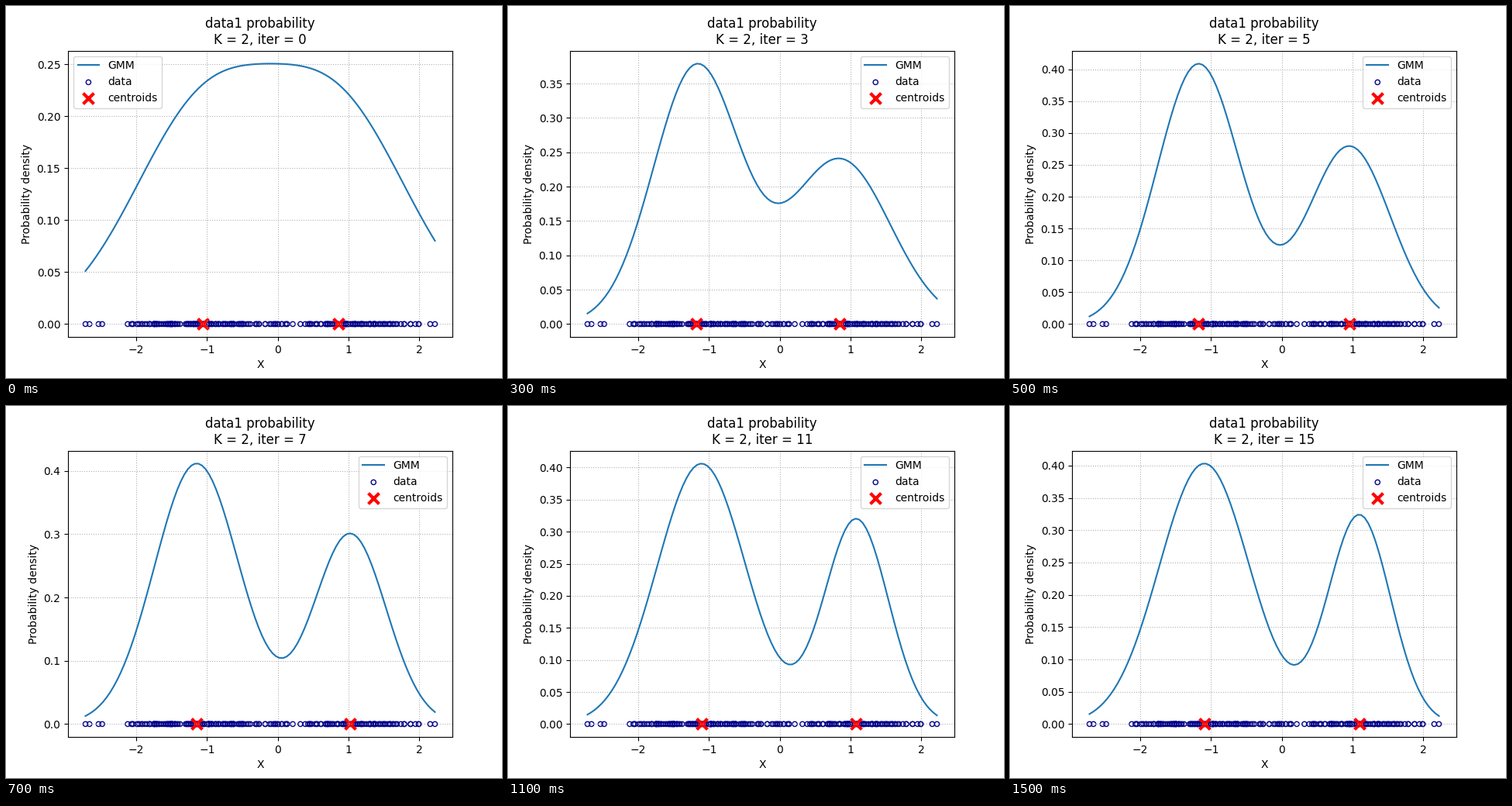
A matplotlib script for the animation above (1.6 s loop, 640 by 480 pixels).

```python
import numpy as np
import matplotlib.pyplot as plt
from matplotlib.animation import FuncAnimation

STEPS = 16
N_SAMPLES = 250
X_MIN, X_MAX = -2.717, 2.222
MARGIN = 0.05

# Each mixture is (weights, means, deviations) of its two components
POPULATION = np.array([[0.645, 0.355], [-1.089, 1.102], [0.640, 0.437]])
START = np.array([[0.5, 0.5], [-1.063, 0.864], [1.0, 1.0]])


def components(x, mixture):
    """Weighted normal densities, one column per component."""
    weights, means, devs = mixture
    z = (x[:, None] - means) / devs
    return weights * np.exp(-z ** 2 / 2) / (devs * np.sqrt(2 * np.pi))


def em_step(mixture, x, mass):
    """One expectation-maximisation update for points x with given mass."""
    parts = components(x, mixture)
    resp = parts / parts.sum(axis=1, keepdims=True) * mass[:, None]
    weights = resp.sum(axis=0)
    means = x @ resp / weights
    variances = ((x[:, None] - means) ** 2 * resp).sum(axis=0) / weights
    return np.array([weights, means, np.sqrt(variances)])


def fit_history():
    """Mixtures after 0, 1, 2, ... updates on the population density."""
    x = np.linspace(-5, 5, 1001)
    mass = components(x, POPULATION).sum(axis=1)
    mass /= mass.sum()
    history = [START]
    while len(history) < STEPS:
        history.append(em_step(history[-1], x, mass))
    return history


def make_samples():
    rng = np.random.default_rng(4)
    weights, means, devs = POPULATION
    group = rng.choice(2, N_SAMPLES, p=weights)
    values = rng.normal(means[group], devs[group])
    inside = values[(values > X_MIN) & (values < X_MAX)]
    return np.concatenate([[X_MIN, X_MAX], inside])


history = fit_history()
samples = make_samples()
curve_x = np.linspace(X_MIN, X_MAX, 100)
pad = MARGIN * (X_MAX - X_MIN)

fig, ax = plt.subplots(figsize=(6.4, 4.8), dpi=100)


def draw(step):
    mixture = history[step]
    density = components(curve_x, mixture).sum(axis=1)
    top = density.max()

    ax.clear()
    ax.plot(curve_x, density, color="tab:blue", label="GMM")
    ax.scatter(samples, np.zeros_like(samples), s=20, facecolors="none",
               edgecolors="darkblue", linewidths=1, label="data")
    ax.scatter(mixture[1], [0, 0], s=100, marker="x", color="red",
               linewidths=3, label="centroids")
    ax.set_xlim(X_MIN - pad, X_MAX + pad)
    ax.set_ylim(-MARGIN * top, (1 + MARGIN) * top)
    ax.set_title(f"data1 probability\nK = 2, iter = {step}")
    ax.set_xlabel("X")
    ax.set_ylabel("Probability density")
    ax.grid(linestyle=":")
    ax.legend(loc="upper right" if step else "upper left")


anim = FuncAnimation(fig, draw, frames=STEPS, interval=100,
                     repeat=True, repeat_delay=0)
plt.show()
```
